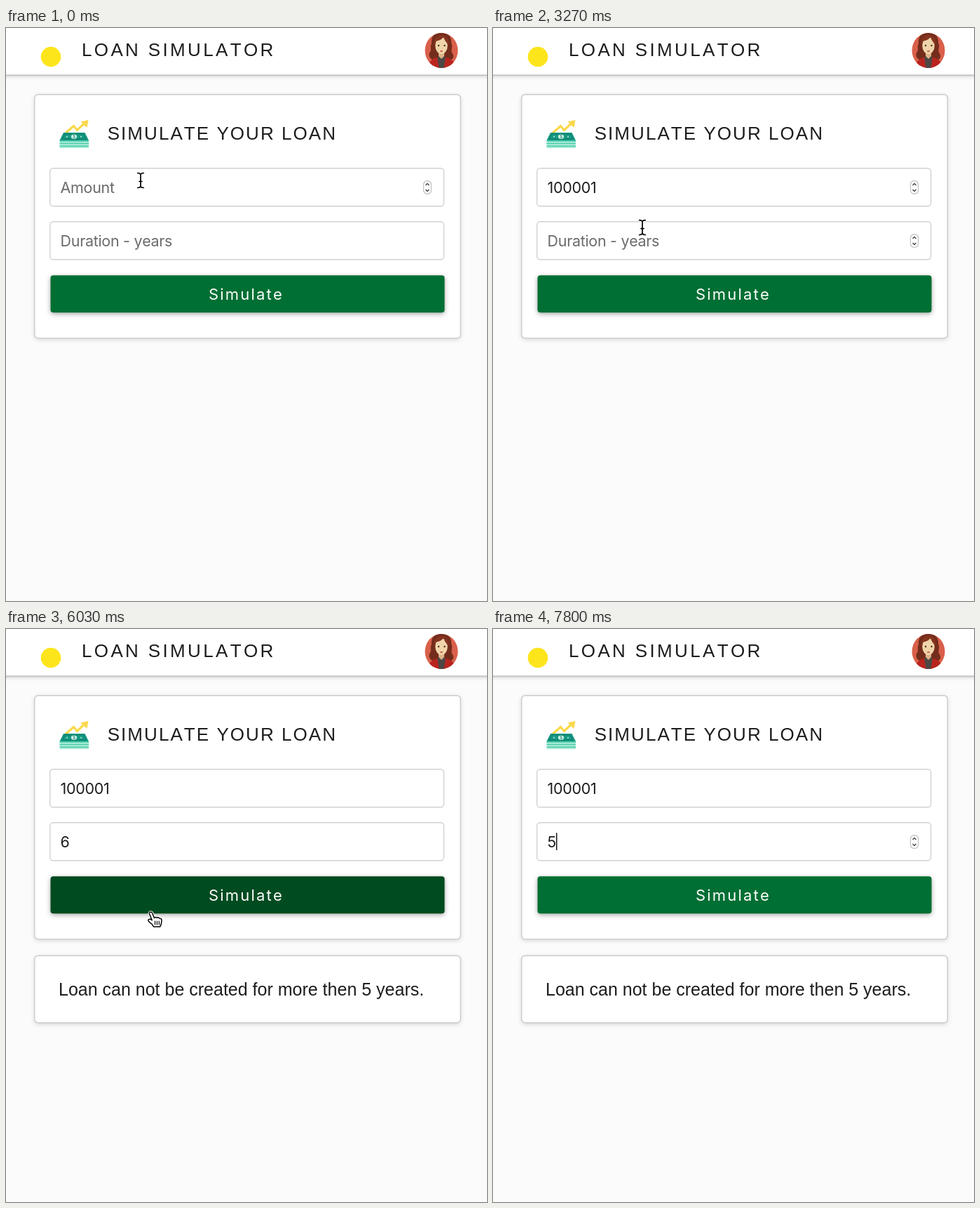
Animation of 686 by 816 pixels, one loop 8 s. Source, as an HTML page with a canvas:

```html
<!DOCTYPE html>
<html lang="en">
<head>
<meta charset="utf-8">
<title>Loan simulator</title>
<style>
  html, body { margin: 0; width: 100%; height: 100%; overflow: hidden; background: #fbfbfb; }
  canvas { display: block; }
</style>
</head>
<body>
<canvas id="stage" width="686" height="816"></canvas>
<script>
const ctx = document.getElementById('stage').getContext('2d');
const LOOP = 8000;
const SANS = '"Liberation Sans", Arial, sans-serif';
const UI = 'Inter, "Open Sans", sans-serif';
const INK = '#1d1d1f';

const AMOUNT = { x: 62.7, y: 199.7, w: 561.8, h: 54, hint: 'Amount' };
const YEARS = { x: 62.7, y: 275.8, w: 561.8, h: 54, hint: 'Duration - years' };
const BUTTON = { x: 63.5, y: 352.3, w: 562, h: 53 };

// Clicks and key presses: time, focused field, amount text, years text
const events = [
  [0, null, '', ''],
  [470, AMOUNT, '', ''],
  [1330, AMOUNT, '1', ''],
  [1530, AMOUNT, '10', ''],
  [1770, AMOUNT, '100', ''],
  [2330, AMOUNT, '1000', ''],
  [2500, AMOUNT, '10000', ''],
  [2700, AMOUNT, '100001', ''],
  [3600, YEARS, '100001', ''],
  [5000, YEARS, '100001', '6'],
  [5700, null, '100001', '6'],
  [6970, YEARS, '100001', '6'],
  [7600, YEARS, '100001', ''],
  [7780, YEARS, '100001', '5']
];

// Pointer path: time, x, y
const path = [
  [0, 192, 217], [269, 192, 217], [270, 192, 216], [2940, 192, 216],
  [3270, 213, 284], [3600, 213, 294.5], [5180, 213, 294.5],
  [5300, 210, 380], [5500, 208, 398], [6000, 208, 398], [6030, 207, 403],
  [6150, 208, 401], [6600, 218, 343.5], [6830, 206, 321], [7000, 204, 302]
];
const hiddenSpans = [[1330, 2970], [5000, 5200], [7600, LOOP]];

function pointerAt(t) {
  const i = path.findIndex(p => p[0] > t);
  if (i < 0) return path[path.length - 1].slice(1);
  const [t0, x0, y0] = path[i - 1], [t1, x1, y1] = path[i];
  const k = (t - t0) / (t1 - t0);
  return [x0 + (x1 - x0) * k, y0 + (y1 - y0) * k];
}

const inside = (b, [x, y]) => x >= b.x && x <= b.x + b.w && y >= b.y && y <= b.y + b.h;

function text(str, x, y, size, family, color, spacing = 0) {
  ctx.font = `${size}px ${family}`;
  ctx.letterSpacing = spacing + 'px';
  ctx.fontKerning = 'none';
  ctx.fillStyle = color;
  ctx.fillText(str, x, y);
  return ctx.measureText(str).width;
}

function poly(color, ...pts) {
  ctx.beginPath();
  pts.forEach(([x, y]) => ctx.lineTo(x, y));
  ctx.closePath();
  ctx.fillStyle = color;
  ctx.fill();
}

function oval(color, x, y, rx, ry = rx) {
  ctx.beginPath();
  ctx.ellipse(x, y, rx, ry, 0, 0, Math.PI * 2);
  ctx.fillStyle = color;
  ctx.fill();
}

function shape(d, color) {
  ctx.fillStyle = color;
  ctx.fill(new Path2D(d));
}

function panel(x, y, w, h, fill, border, radius, shadow) {
  ctx.save();
  ctx.beginPath();
  ctx.roundRect(x, y, w, h, radius);
  if (shadow) {
    ctx.shadowColor = `rgba(0,0,0,${shadow})`;
    ctx.shadowBlur = 7;
    ctx.shadowOffsetY = 2;
  }
  ctx.fillStyle = fill;
  ctx.fill();
  ctx.restore();
  if (!border) return;
  ctx.strokeStyle = border;
  ctx.lineWidth = 1.4;
  ctx.stroke();
}

function header() {
  ctx.save();
  ctx.shadowColor = 'rgba(0,0,0,.25)';
  ctx.shadowBlur = 6;
  ctx.shadowOffsetY = 1;
  ctx.fillStyle = '#fff';
  ctx.fillRect(-10, -10, 706, 77);
  ctx.restore();
  ctx.fillStyle = '#bdbdbd';
  ctx.fillRect(0, 66.4, 686, 1.3);
  oval('#fde51c', 64, 41, 14.3);
  text('LOAN SIMULATOR', 108, 40, 26, SANS, INK, 3.35);
  avatar();
}

function avatar() {
  ctx.save();
  ctx.beginPath();
  ctx.ellipse(621, 32, 23.5, 25, 0, 0, Math.PI * 2);
  ctx.clip();
  ctx.fillStyle = '#d9604a';
  ctx.fillRect(597, 6, 48, 52);
  shape('M621 7C610 6 606 14 607 22C604 27 608 31 604 35C602 41 606 45 611 46L632 46C638 45 640 40 636 35C634 31 638 27 635 21C636 12 630 7 621 7Z', '#742d1c');
  shape('M602 60C602 49 607 44 614 42L628 42C636 44 641 49 641 60Z', '#b9241f');
  shape('M615 41L627 41L624 60L618 60Z', '#4d4744');
  shape('M617 33H625V40L621 44L617 40Z', '#dcb489');
  oval('#f0d5aa', 621, 25, 8.8, 12);
  shape('M611 25C610 15 614 10 622 10C629 10 632 17 631 24C627 20 625 16 624 13C621 17 616 18 613 19Z', '#85341f');
  oval('#4a251b', 617, 25, 1.2);
  oval('#4a251b', 625.5, 25, 1.2);
  oval('#c65a48', 621, 33, 2.2, 0.9);
  ctx.restore();
}

function moneyIcon() {
  ctx.strokeStyle = '#fbd84b';
  ctx.lineWidth = 3.2;
  ctx.lineJoin = 'miter';
  ctx.stroke(new Path2D('M85 149.5L96.5 139.5L101.5 145.5L112 135.5'));
  poly('#fbd84b', [106.5, 133.5], [117.5, 131], [115.5, 142]);
  poly('#169a83', [82, 149], [112.5, 149], [118, 160], [76.5, 160]);
  ctx.strokeStyle = '#0c7767';
  ctx.lineWidth = 1;
  ctx.stroke(new Path2D('M84 151H110.5L114 158H80Z'));
  oval('#d7f6e9', 97, 154.7, 4, 3.3);
  text('$', 95.2, 157.3, 6.5, SANS, '#0c7767');
  oval('#bdf0dd', 87, 154.7, 1);
  oval('#bdf0dd', 107, 154.7, 1);
  for (let i = 0; i < 6; i++) {
    ctx.fillStyle = i % 2 ? '#a9ecd6' : '#43c9a6';
    ctx.fillRect(76.5, 160 + i * 1.85, 41.5, 1.85);
  }
}

function spinner(y) {
  panel(595.5, y - 9.3, 11, 18.6, '#fff', '#c6c6c6', 5);
  ctx.strokeStyle = '#454545';
  ctx.lineWidth = 1.4;
  ctx.stroke(new Path2D(`M598.5 ${y - 3}L601 ${y - 5.5}L603.5 ${y - 3}M598.5 ${y + 3}L601 ${y + 5.5}L603.5 ${y + 3}`));
}

function field(box, value, caret, active) {
  panel(box.x, box.y, box.w, box.h, '#fff', '#d2d2d2', 4.5);
  const width = text(value || box.hint, 77.5, box.y + 35.5, 21.5, UI, value ? INK : '#6b6b6b', -0.3);
  if (active) spinner(box.y + 27.3);
  if (caret) {
    ctx.fillStyle = '#111';
    ctx.fillRect(77.5 + (value ? width : 0), box.y + 14.6, 1.5, 24.5);
  }
}

// Dark pointer shapes sit on a white halo
function outline(d, fill, width) {
  const p = new Path2D(d);
  ctx.lineJoin = ctx.lineCap = 'round';
  ctx.strokeStyle = '#fff';
  ctx.lineWidth = width + 2;
  ctx.stroke(p);
  if (fill) {
    ctx.fillStyle = fill;
    ctx.fill(p);
  }
  if (fill === '#000') return;
  ctx.strokeStyle = '#000';
  ctx.lineWidth = width;
  ctx.stroke(p);
}

function pointer(pos, overButton, overField) {
  ctx.save();
  ctx.translate(...pos);
  if (overButton) {
    outline('M-2.5 2.5C-3 -.5 .8 -.8 1.8 2L4.5 8.5Q6.5 6.5 8.5 8.3Q11 7 12 9.3Q15 8.7 15 12L14.5 16Q14 18.5 12.8 21H3.5Q1.5 17 -2.5 14.5Q-6 11 -2.5 10.2Q-.5 10 1.2 11.8Z', '#fff', 1.5);
    ctx.lineWidth = 1.2;
    ctx.stroke(new Path2D('M5.5 13V18M8.4 13V18M11.3 13V18'));
  } else if (overField) {
    outline('M-4.3 -10.5Q0 -10.5 0 -7.5Q0 -10.5 4.3 -10.5M0 -7.5V7.5M-4.3 10.5Q0 10.5 0 7.5Q0 10.5 4.3 10.5M-2 1.5H2', null, 1.7);
  } else {
    outline('M0 0V17.5L4 13.8L6.9 21L10 19.7L7 12.7H12Z', '#000', 0.6);
  }
  ctx.restore();
}

function draw(t) {
  const [since, focus, amount, years] = events.filter(e => e[0] <= t).pop();
  const pos = pointerAt(t);
  const caretOn = Math.floor((t - since) / 500) % 2 === 0;
  const hot = box => focus === box || inside(box, pos);
  const overButton = inside(BUTTON, pos);

  ctx.fillStyle = '#fbfbfb';
  ctx.fillRect(0, 0, 686, 816);
  header();

  panel(40.8, 94.8, 607.4, 346.8, '#fff', '#cbcbcb', 5, 0.16);
  moneyIcon();
  text('SIMULATE YOUR LOAN', 144.7, 159, 26, SANS, INK, 2.05);
  field(AMOUNT, amount, focus === AMOUNT && caretOn, hot(AMOUNT));
  field(YEARS, years, focus === YEARS && caretOn, hot(YEARS));
  panel(BUTTON.x, BUTTON.y, BUTTON.w, BUTTON.h, overButton ? '#004b20' : '#006f33', null, 4, 0.35);
  text('Simulate', 289, 387, 22, UI, '#fff', 2.2);

  if (t >= 5720) {
    panel(40.8, 465.2, 607.4, 95.6, '#fff', '#cbcbcb', 5, 0.16);
    text('Loan can not be created for more then 5 years.', 75, 521.5, 25, SANS, INK);
  }
  if (!hiddenSpans.some(([a, b]) => t >= a && t < b)) {
    pointer(pos, overButton, inside(AMOUNT, pos) || inside(YEARS, pos));
  }
}

const start = performance.now();
function tick() {
  draw((performance.now() - start) % LOOP);
  requestAnimationFrame(tick);
}
tick();
</script>
</body>
</html>
```
